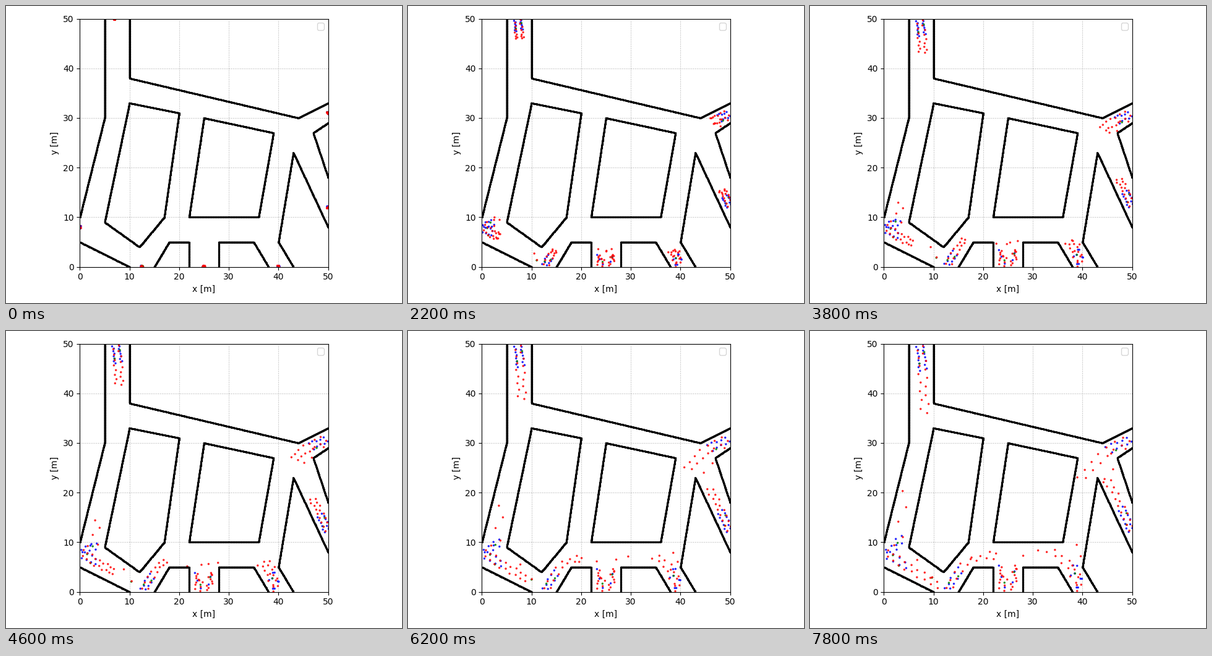
A matplotlib script for the animation above (8000 ms loop, 640 px wide and 480 px high).

```python
import numpy as np
import matplotlib.pyplot as plt
from matplotlib.animation import FuncAnimation

FRAMES, STEP = 40, 200
LAST = FRAMES - 1

# colour: farthest distance its people walk in one loop [m]
CAPS = {"red": 14.5, "green": 4, "blue": 5.5}

WALLS = [
    [(0, 10), (5, 30), (5, 50)],
    [(10, 50), (10, 38), (44, 30), (50, 33)],
    [(10, 33), (20, 31), (17, 10), (12, 4), (5, 9), (10, 33)],
    [(25, 30), (39, 27), (36, 10), (22, 10), (25, 30)],
    [(50, 29), (47, 27), (50, 18)],
    [(50, 8), (43, 23), (40, 5), (43, 0)],
    [(0, 5), (10, 0)],
    [(15, 0), (18, 5), (22, 5), (22, 0)],
    [(28, 0), (28, 5), (35, 5), (38, 0)],
]

rng = np.random.default_rng(4)
crowds, colors = [], []


def lengths(path):
    return np.r_[0, np.cumsum(np.hypot(*np.diff(path, axis=0).T))]


def at(path, dist):
    """Points at the given distances along a polyline."""
    path = np.array(path, float)
    cum = lengths(path)
    return np.c_[np.interp(dist, cum, path[:, 0]), np.interp(dist, cum, path[:, 1])]


def normals(path, dist):
    way = at(path, dist + 0.8) - at(path, dist - 0.8)
    way /= np.hypot(*way.T)[:, None]
    return np.c_[-way[:, 1], way[:, 0]]


def route(path, width=0.9, **counts):
    """People who leave one gate, fan out sideways and string out along a path."""
    for color, n in counts.items():
        reach = min(lengths(path)[-1], CAPS[color])
        goal = reach * (np.arange(1, n + 1) / n) ** 1.1
        side = width * rng.uniform(0.3, 1, n) * (-1) ** np.arange(n)
        start = rng.uniform(-0.25, 0.25, (n, 2))
        crowds.append((path, goal, side, start))
        colors.extend([color] * n)


def place(frame, path, goal, side, start):
    # short walks slow down early, long ones keep their pace
    dist = goal * (frame / LAST) ** (0.4 + 0.6 * goal / CAPS["red"])
    fan = 1 - np.exp(-frame / 3)
    return at(path, dist) + normals(path, dist) * side[:, None] * fan + start * (1 - fan)


route([(7, 50), (7.7, 46), (8.3, 36)], blue=16, green=2, red=17)
route([(50, 31), (45, 28.5), (39.6, 22.5)], blue=10, green=1, red=14)
route([(50, 31), (46, 27.7), (44.6, 22)], red=4)
route([(50, 12), (47.2, 18.3), (45, 23)], 0.8, blue=12, green=2, red=17)
route([(40, 0), (37.5, 5), (33.4, 8.7)], blue=4, red=13)
route([(40, 0), (38.5, 5), (39.3, 9.4)], blue=4, green=1, red=5)
route([(25, 0), (25, 5.3)], 1.9, blue=5, green=2, red=18)
route([(25, 0), (26, 5), (30.8, 8.7)], red=4)
route([(25, 0), (24, 5), (18, 7.7)], red=3)
route([(12.5, 0), (16.2, 5.7), (22.5, 8)], 0.8, blue=9, green=2, red=14)
route([(12.5, 0), (9, 4), (6.5, 6.2)], 0.4, green=1, red=2)
route([(0, 8), (5, 5), (11, 1)], blue=8, green=2, red=18)
route([(0, 8), (3, 9), (4.5, 21.5)], blue=8, green=1, red=5)

fig, ax = plt.subplots(figsize=(6.4, 4.8), dpi=100)
ax.set(xlim=(0, 50), ylim=(0, 50), aspect="equal", xlabel="x [m]", ylabel="y [m]")
ax.set_xticks(range(0, 51, 10))
ax.set_yticks(range(0, 51, 10))
ax.grid(linestyle="dotted")
ax.set_axisbelow(True)
ax.legend([], [], loc="upper right")

# walls are rows of close dots
for wall in WALLS:
    end = lengths(wall)[-1]
    ax.plot(*at(wall, np.linspace(0, end, int(end * 10))).T, "-o",
            color="black", markersize=1.3)

dots = ax.scatter(np.zeros(len(colors)), np.zeros(len(colors)), s=6.2,
                  c=colors, alpha=0.85, linewidths=0, zorder=1.5)

# the equal aspect needs a few passes to settle
for _ in range(4):
    fig.tight_layout()


def draw(frame):
    dots.set_offsets(np.vstack([place(frame, *crowd) for crowd in crowds]))
    return (dots,)


anim = FuncAnimation(fig, draw, frames=FRAMES, interval=STEP,
                     repeat=True, repeat_delay=0)
plt.show()
```
